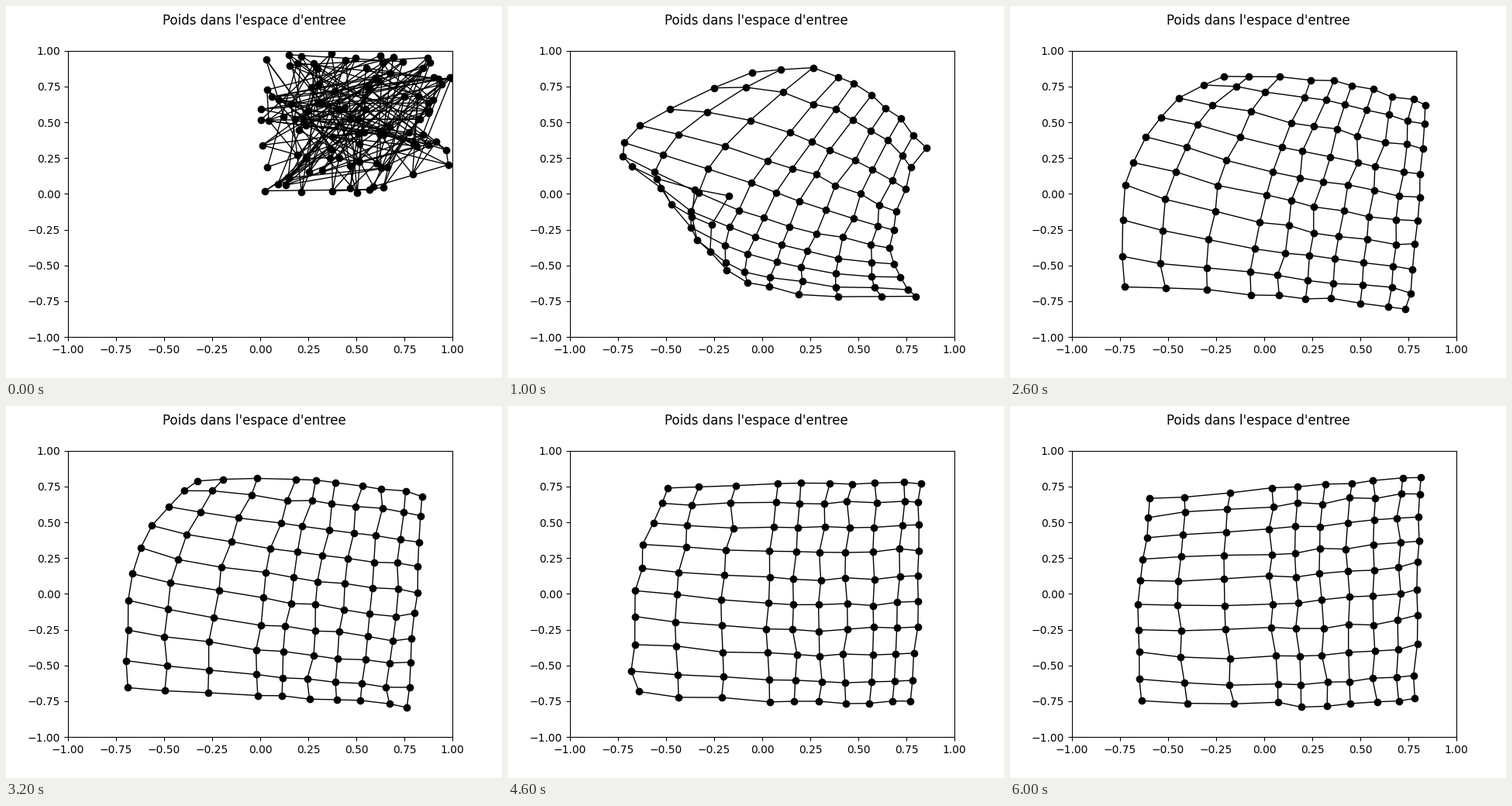
A matplotlib script that plays this animation: 640x480 px, repeating every 6.2 s.

```python
import numpy as np
import matplotlib.pyplot as plt
from matplotlib.animation import FuncAnimation

N = 10
FRAMES = 31
rng = np.random.default_rng(7)


def basis(spacing, mid):
    """Quadratic weights of the first, mid and last line for all N lines."""
    knots = spacing[[0, mid, N - 1]]
    return np.vander(spacing, 3) @ np.linalg.inv(np.vander(knots, 3))


# Lines sit closer at the borders, and columns are wider on the left
LINES = np.arange(N)
ACROSS = basis(np.interp(LINES, [0, 1, 3, 8, 9], [0, 0.143, 0.47, 0.935, 1]), 4)
DOWN = basis(np.interp(LINES, [0, 1, 8, 9], [0, 0.09, 0.91, 1]), 5)


def net(top, middle, bottom):
    """Bend the whole net through nine key points given as x + yj."""
    return DOWN @ np.array([top, middle, bottom]) @ ACROSS.T


# Random weights, folded net, open net, squarer net, final net
poses = {
    0: rng.random((N, N)) + 1j * rng.random((N, N)),
    5: net([-0.05 + 0.85j, 0.48 + 0.76j, 0.84 + 0.32j],
           [-0.73 + 0.27j, 0.01 - 0.16j, 0.67 - 0.38j],
           [-0.16 - 0.01j, -0.09 - 0.61j, 0.81 - 0.72j]),
    9: net([-0.06 + 0.83j, 0.43 + 0.78j, 0.84 + 0.53j],
           [-0.69 + 0.34j, 0.13 - 0.04j, 0.77 - 0.26j],
           [-0.77 - 0.63j, 0.02 - 0.71j, 0.73 - 0.83j]),
    19: net([-0.45 + 0.78j, 0.23 + 0.79j, 0.84 + 0.75j],
            [-0.65 + 0.06j, 0.16 - 0.07j, 0.81 - 0.10j],
            [-0.66 - 0.67j, 0.15 - 0.72j, 0.78 - 0.76j]),
    30: net([-0.59 + 0.66j, 0.17 + 0.75j, 0.81 + 0.81j],
            [-0.65 - 0.07j, 0.17 - 0.06j, 0.79 + 0.03j],
            [-0.63 - 0.73j, 0.20 - 0.78j, 0.78 - 0.73j]),
}
KEYS = list(poses)

# Small unrest of the weights while they learn
noise = rng.normal(0, 0.008, (2, FRAMES, N, N))
unrest = noise[0] + 1j * noise[1]
unrest[0] = 0


def weights(frame):
    i = min(np.searchsorted(KEYS, frame, side="right"), len(KEYS) - 1)
    a, b = KEYS[i - 1], KEYS[i]
    t = (frame - a) / (b - a)
    if a == 0:
        t = 1 - (1 - t) ** 4  # the net unfolds fast at first
    return poses[a] + (poses[b] - poses[a]) * t + unrest[frame]


fig, ax = plt.subplots(figsize=(6.4, 4.8), dpi=100)
fig.suptitle("Poids dans l'espace d'entree")
ax.set(xlim=(-1, 1), ylim=(-1, 1))
rows = [ax.plot([], [], "k-", lw=1)[0] for _ in range(N)]
cols = [ax.plot([], [], "k-", lw=1)[0] for _ in range(N)]
dots, = ax.plot([], [], "ko", ms=6)


def draw(frame):
    w = weights(frame)
    for line, p in zip(rows + cols, [*w, *w.T]):
        line.set_data(p.real, p.imag)
    dots.set_data(w.real.ravel(), w.imag.ravel())
    return [*rows, *cols, dots]


anim = FuncAnimation(fig, draw, frames=FRAMES, interval=200, repeat=True)
plt.show()
```
